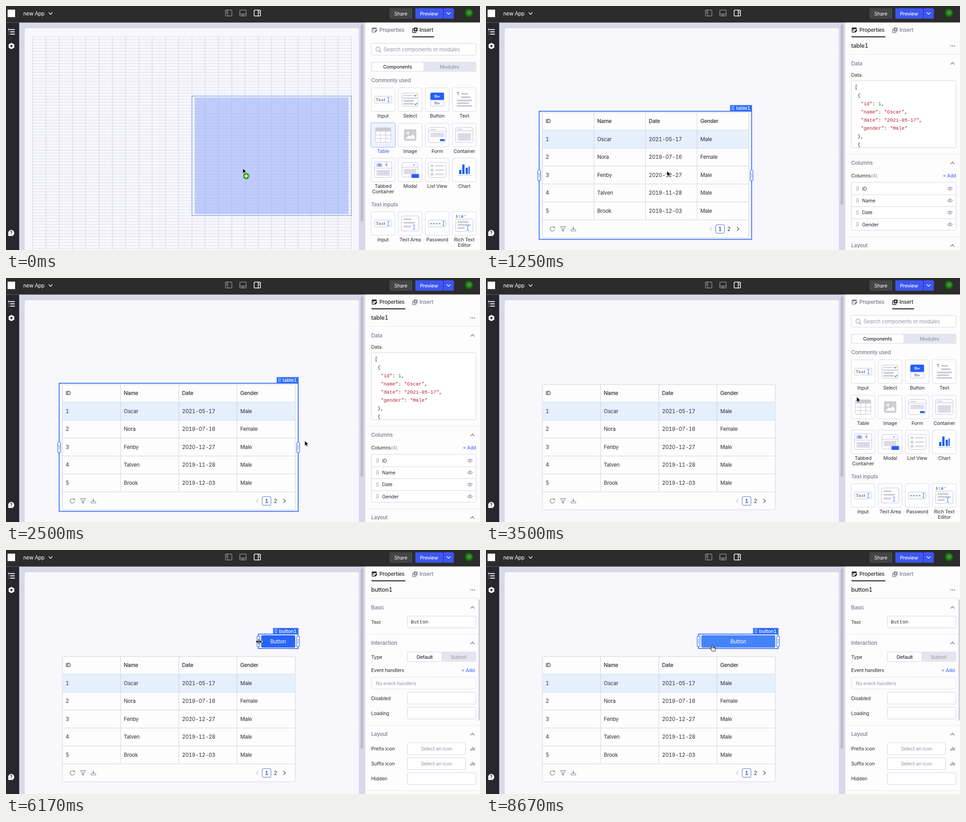
Write an HTML page that moves like this. It is 1041 by 538 pixels and loops after 8.76 s.

```html
<!DOCTYPE html>
<html lang="en">
<head>
<meta charset="utf-8">
<title>App builder</title>
<style>
html, body { margin: 0; width: 100%; height: 100%; overflow: hidden; background: #d8d8e8; }
svg { display: block; width: 1041px; height: 538px; }
text { font: 400 11.5px Inter, "Open Sans", sans-serif; letter-spacing: -.015em; fill: #2b2b33; font-variant-numeric: tabular-nums; }
text.s { font-size: 10.7px; }
text.b { font-weight: 500; }
text.bb { font-weight: 600; }
text.m { text-anchor: middle; }
text.h { fill: #797993; font-weight: 500; }
text.g { fill: #9696aa; }
text.w { fill: #fff; }
text.blue { fill: #315efb; }
text.title { font-size: 12.8px; font-weight: 500; }
text.mono { font: 10.7px "Liberation Mono", monospace; letter-spacing: 0; }
text.tiny { font-size: 7px; font-weight: 700; letter-spacing: .2px; fill: #77778c; }
text.icon { font-size: 9px; font-weight: 700; letter-spacing: .6px; fill: #77778c; }
text.w.tiny { fill: #fff; }
text.js { font-size: 10px; font-style: italic; font-weight: 700; fill: #77778c; }
.red { fill: #b3202c; } .green { fill: #1d7a48; } .soft { fill: #8f8fa3; }
</style>
</head>
<body>
<svg viewBox="0 0 1041 538">
  <defs>
    <radialGradient id="leaf" cx=".6" cy=".45"><stop offset="0" stop-color="#4fae34"/><stop offset=".55" stop-color="#247a1c"/><stop offset="1" stop-color="#123c12"/></radialGradient>
  </defs>
  <g id="shell"></g>
  <g id="live"></g>
</svg>
<script>
const LOOP = 8760, BLUE = '#2f6bf6', LINE = '#d3d3e0', ICON = '#77778c', PALE = '#dcdce8';
const COL = 700 / 24, ROW = 6.58, GX = 58.4, GY = 67;
const gx = c => GX + c * COL, gy = r => GY + r * ROW;

const R = (x, y, w, h, fill = 'none', rx = 0, stroke = 'none', more = '') =>
  `<rect x="${x}" y="${y}" width="${w}" height="${h}" fill="${fill}" rx="${rx}" stroke="${stroke}" ${more}/>`;
const T = (x, cy, s, cls = '') => `<text x="${x}" y="${cy + 4}" class="${cls}">${s}</text>`;
const P = (d, stroke, w = 1.2, fill = 'none') =>
  `<path d="${d}" stroke="${stroke}" stroke-width="${w}" fill="${fill}" stroke-linecap="round" stroke-linejoin="round"/>`;
const C = (x, y, r, fill, stroke = 'none') => `<circle cx="${x}" cy="${y}" r="${r}" fill="${fill}" stroke="${stroke}"/>`;
const G = (x, y, s, more = '') => `<g transform="translate(${x} ${y}) ${more}">${s}</g>`;
const list = (n, f) => Array.from({ length: n }, (_, i) => f(i)).join('');
const chev = (x, y, turn = 0, color = ICON, r = 3.8) =>
  G(x, y, P(`M${-r} ${-r / 2}L0 ${r / 2}L${r} ${-r / 2}`, color, 1.4), `rotate(${turn})`);
const dots = (x, y, color) => list(6, i => R(x + i % 2 * 3.2, y - 4.4 + (i >> 1) * 3.4, 1.7, 1.7, color));
const hline = y => R(789, y, 252, 1, '#e8e8f0');
const box = (x, y, w, h) => R(x, y, w, h, '#fff', 3, LINE);

// ---- fixed frame around the workspace
const layoutIcon = (x, bar, color) => G(x, 15.5,
  R(-7, -6.5, 14, 13, 'none', 2, color, 'stroke-width="1.4"') + P(bar, color, 1.4));
const shell =
  R(0, 0, 1041, 538, '#d8d8e8') + R(41, 49, 734, 500, '#f7f7fc', 4) +
  R(0, 0, 1041, 36.5, '#2c2c2c') + R(0, 36.5, 29, 502, '#27272f') +
  R(3.5, 8, 16.5, 16.5, '#fff') +
  T(38, 16.5, 'new App', 'w') + chev(98, 16.5, 0, '#fff') +
  layoutIcon(489, 'M-2-6V6M-5-3H-4M-5 0H-4', '#8c8c8c') +
  layoutIcon(520.5, 'M-7 2H7M-3 4.4H3', '#8c8c8c') +
  layoutIcon(552, 'M2-6V6M4-3H5M4 0H5', '#fff') +
  R(842, 5, 50, 23, '#454545', 3) + T(867, 16.5, 'Share', 'w s m') +
  R(899, 5, 84.5, 23, '#3b57f3', 3) + R(960, 5, 1, 23, '#2c2c2c') +
  T(929, 16.5, 'Preview', 'w s m b') + chev(972, 16.5, 0, '#fff', 3.4) +
  C(1015, 16, 10.5, 'url(#leaf)') +
  P('M10 52H18.5M10 57H18.5M10 62H18.5', '#fff', 1.9) + P('M6 50.5L8 52L6 53.5ZM6 57H7M6 62H7', '#fff', 1.2, '#fff') +
  P('M12 82L17.5 85V91.5L12 94.5L6.5 91.5V85Z', '#fff', 1.4, '#fff') + C(12, 88.2, 2.4, '#27272f') +
  P('M5.2 506.5L6 502L9 506Z', '#fff', 1, '#fff') + C(11.5, 500.5, 6.7, '#fff') +
  T(11.5, 500.3, '?', 's bb m');

// ---- component cards
const beam = (x, y, color = BLUE, h = 5) =>
  P(`M${x - 2} ${y - h}Q${x} ${y - h} ${x} ${y - h + 1.5}Q${x} ${y - h} ${x + 2} ${y - h}M${x} ${y - h + 1}V${y + h - 1}M${x - 2} ${y + h}Q${x} ${y + h} ${x} ${y + h - 1.5}Q${x} ${y + h} ${x + 2} ${y + h}`, color, 1);
const frame = (x, y, w, h) => R(x, y, w, h, '#fff', 2.5, '#b9c0dc');
const bar = (x, y, w, c = '#c9c9d3') => R(x, y, w, 3.6, c, .8);
const icons = {
  Input: frame(-19, -7.5, 38, 15) + T(-16, -.6, 'Text', 'icon') + beam(11.5, 0),
  Select: frame(-18, -14.5, 35.5, 10.5) + bar(-15, -11, 20, PALE) + chev(11, -9, 0, ICON, 2.6) +
    frame(-18, -2.5, 35.5, 17) + bar(-14.5, 1, 22) + bar(-14.5, 7.5, 22) + P('M10 9.5L12 11.3L15 7.8', BLUE, 1.5),
  Button: R(-15, -15.5, 30, 16, '#2160fb', 2.5) + T(0, -8.8, 'Btn', 'tiny w m') + frame(-15, 1.5, 30, 12.5) + T(0, 6.3, 'Btn', 'tiny m'),
  Text: T(-16.5, -14, 'T', 'icon') + bar(-7, -14.5, 15) + bar(-7, -7.2, 20) + bar(-16.5, 0, 33) + bar(-16.5, 6, 27) + bar(-16.5, 12, 33),
  Table: R(-17, -16, 34, 32, '#fff', 3, '#c6c6d0') + R(-17, -16, 34, 8, '#cbcbd4', 2) +
    P('M-17 0H17M-17 8H17M-6-8V16M6-8V16', '#c6c6d0', 1.2),
  Image: R(-13.5, -12.5, 27, 25, '#cbcbd1', 3) + C(-5, -4.5, 2.5, '#fff') + P('M-10 8L-3 1L1 4L6-2L10 4V8Z', '#fff', .5, '#fff'),
  Form: frame(-19, -16.5, 38, 33) + P('M-15-12H-4', '#b9b9c8', 1.6) + P('M-19-8.5H19', '#b9c0dc', 1) +
    R(-15, -5, 30, 9.5, PALE, 1) + R(6, 9, 10.5, 4.5, '#2160fb', 1),
  Container: frame(-19, -16.5, 38, 33) + P('M-15-12.5H-4', '#b9b9c8', 1.6) + P('M-19-9H19', '#b9c0dc', 1) + R(-14.5, -4, 29, 16.5, PALE, 1),
  'Tabbed|Container': frame(-19, -18, 38, 34.5) + P('M-19-4H19', '#b9c0dc', 1) + R(-15, -15, 14, 8.5, '#b5cafd', 4) +
    T(-8, -12.2, 'A', 'tiny m') + T(7.5, -12.2, 'B', 'tiny m') + R(-14.5, 0, 29, 12.5, PALE, 1),
  Modal: frame(-18, -16.5, 35, 32) + P('M7-12.5L10-9.5M10-12.5L7-9.5', ICON, 1) + P('M-18-6H17', '#b9c0dc', 1) +
    R(-14, -2.5, 27, 12, PALE, 1) + R(3, 9, 16.5, 8.5, '#2160fb', 1.5),
  'List View': frame(-19, -16.5, 38, 33) + list(3, i => R(-14.5, -12 + i * 9.5, 6, 5.5, '#cfcfd9', 1) + bar(-5, -11 + i * 9.5, 20, PALE)),
  Chart: R(-11.5, 0, 5, 9, '#2160fb') + R(-4.5, -12, 5, 21, '#2160fb') + R(3, -5, 5, 14, '#2160fb') + R(9.5, -8, 2.5, 17, '#2160fb') + P('M-15 12H15', '#b9c0dc', 1.2),
  'Text Area': frame(-19, -16.5, 38, 33) + bar(-14.5, -11, 17) + bar(-14.5, -3.5, 25) + bar(-14.5, 5, 16) + beam(8.5, 8),
  Password: frame(-19, -7.5, 38, 15) + T(-16.5, 1.6, '****', 'icon') + beam(13.5, 0),
  'Rich Text|Editor': T(-18.5, -17, 'B <tspan font-style="italic">I</tspan> <tspan fill="#2160fb">A</tspan> ”', 'tiny') +
    frame(-19, -9.5, 38, 27) + bar(-14.5, -5, 24) + bar(-14.5, 1.5, 29) + bar(-14.5, 8.5, 15) + beam(7.5, 10),
};
const names = Object.keys(icons);
const rows = [[206.5, names.slice(0, 4)], [284.5, names.slice(4, 8)], [361.5, names.slice(8, 12)],
  [479.5, ['Input', ...names.slice(12)]]];

function card(name, x, y, on) {
  const label = name.split('|').map((s, i) => T(x, y + 35.5 + i * 12, s, 's m' + (on ? ' blue' : ''))).join('');
  const base = on ? R(x - 27, y - 27, 54, 54, '#edf2fc', 3, '#8fb0fb') : R(x - 26, y - 26, 52, 52, '#fff', 3, '#d6d8e6');
  return base + G(x, y, icons[name]) + label;
}

// ---- side panels
function tabs(insert) {
  const a = insert ? '#7c7c94' : '#1c1c22', b = insert ? '#1c1c22' : '#7c7c94';
  const tab = (x, s, on) => T(x, 53, s, on ? 'b' : 'h');
  return R(789, 36.5, 252, 502, '#fdfdfe') +
    G(803.5, 47.5, R(0, 0, 10.5, 3.5, a, 1) + P('M.7 3V9.5Q.7 10.5 1.7 10.5H4M10 3.5V4.5M2.5 6H5', a, 1.4) + P('M6 10.5L6.5 8.2L9.8 5L11.5 6.7L8.3 10Z', a, 1, a)) +
    tab(820, 'Properties', !insert) +
    G(892.5, 47.5, P('M2 3H.7V11H8V9.5', b, 1.4) + R(3, 0, 8.3, 8.3, b, 1.5) + P('M7.1 2V6.2M5 4.1H9.2', '#fff', 1.2)) +
    tab(908, 'Insert', insert) + (insert ? R(892, 67, 48, 2, '#1c1c22') : R(802.5, 67, 74.5, 2, '#1c1c22'));
}
const section = (y, s) => T(802, y, s, 'h') + chev(1024.5, y, 180);
const head = s => tabs(false) + T(802, 88, s, 'title') + list(3, i => C(1020.5 + i * 4.2, 88, 1.2, ICON)) + hline(106);

const insertPanel = on => tabs(true) +
  box(802.5, 82.5, 230, 26) + C(817, 95.2, 4.6, 'none', ICON) + P('M820.5 98.8L823 101.5', ICON) +
  T(829, 95.8, 'Search components or modules', 'g') +
  R(802, 123, 231, 22, '#e5e5ee', 3) + R(803.5, 124, 114, 20, '#fff', 3, '#dedee8') +
  T(860, 134, 'Components', 's b m') + T(974, 134, 'Modules', 's g m b') +
  T(802, 164, 'Commonly used', 'h') + T(802, 437.5, 'Text inputs', 'h') +
  rows.map(([y, set]) => set.map((n, i) => card(n, 828.2 + i * 59.45, y, n === on)).join('')).join('');

const red = s => `<tspan class="red">"${s}"</tspan>`;
const code = [[810, '['], [816, '{'], [823, red('id') + ': <tspan class="green">1</tspan>,'], [823, red('name') + ': ' + red('Oscar') + ','],
  [823, red('date') + ': ' + red('2021-05-17') + ','], [823, red('gender') + ': ' + red('Male')], [816, '},'], [816, '{']];
const heads = ['ID', 'Name', 'Date', 'Gender'];
const eye = (x, y) => P(`M${x - 5.5} ${y}Q${x} ${y - 7} ${x + 5.5} ${y}Q${x} ${y + 7} ${x - 5.5} ${y}Z`, ICON, 1) + C(x, y, 1.7, 'none', ICON);
const tablePanel = head('table1') + section(126.5, 'Data') + T(802, 152, 'Data', 's') +
  box(802.5, 164.5, 230, 148) + code.map(([x, s], i) => T(x, 178.4 + i * 18.1, s, 'mono')).join('') +
  hline(326) + section(346, 'Columns') + T(802, 373.5, 'Columns<tspan class="soft">(4)</tspan>', 's') + T(1003, 373.5, '+ Add', 's blue') +
  box(802.5, 389, 230, 105.5) +
  heads.map((s, i) => {
    const y = 402.5 + i * 26.4;
    return dots(813.5, y, '#8a8a9c') + T(826, y, s, 's') + eye(1019, y) + (i ? R(803, y - 13.3, 229, 1, LINE) : '');
  }).join('') + hline(509) + section(528, 'Layout');

const field = (y, s, w = 151) => T(802, y, s, 's') + box(881.5, y - 13, w, 26);
const pick = (y, s) => field(y, s, 128) + T(945.5, y, 'Select an icon', 's g m') + T(1019, y, 'Js', 'js');
const buttonPanel = head('button1') + section(126.5, 'Basic') + field(158.7, 'Text') + T(889, 158.3, 'Button', 'mono') +
  hline(185) + section(205, 'Interaction') + T(802, 235.8, 'Type', 's') +
  R(881, 224, 152, 22.5, '#e5e5ee', 3) + R(882, 225, 75, 20.5, '#fff', 3, '#dedee8') +
  T(919.5, 235.5, 'Default', 's b m') + T(994, 235.5, 'Submit', 's g m') +
  T(802, 265.3, 'Event handlers', 's') + T(1000, 265.3, '+ Add', 's blue') +
  R(802.5, 280.5, 230, 26, 'none', 3, '#cfcfdc', 'stroke-dasharray="2.5 2"') + T(812, 293.5, 'No event handlers', 's g') +
  field(326.7, 'Disabled') + field(359.5, 'Loading') + hline(386) + section(406, 'Layout') +
  pick(438, 'Prefix icon') + pick(471, 'Suffix icon') + field(504, 'Hidden') + hline(530) + R(1037.5, 109, 5, 267, '#d3d3de', 2);

// ---- canvas parts
const grid = list(72, i => R(GX, gy(i), 700, 1, '#dadaf0', 0, 'none', 'opacity=".85"')) +
  list(25, i => R(gx(i) - .5, GY, 1, 471, '#d3d3e2'));

const data = [['1', 'Oscar', '2021-05-17', 'Male'], ['2', 'Nora', '2019-07-16', 'Female'], ['3', 'Fenby', '2020-12-27', 'Male'],
  ['4', 'Talven', '2019-11-28', 'Male'], ['5', 'Brook', '2019-12-03', 'Male']];
function table(edge) {
  const l = 124, r = edge - 6.4, w = (r - l) / 4, y = i => 254.3 + i * 39.5;
  return R(l, 235, r - l, 276, '#fdfdfe', 2, '#d0d0de') + R(l + .5, 274, r - l - 1, 39, '#e6effc') +
    list(6, i => R(l, 273.3 + i * 39.55, r - l, 1, '#d0d0de')) + list(3, i => R(l + w * (i + 1) - .5, 235, 1, 236, '#d0d0de')) +
    heads.map((s, c) => T(l + 7 + w * c, y(0), s, 'b')).join('') +
    data.map((d, i) => d.map((s, c) => T(l + 7 + w * c, y(i + 1) - .2, s)).join('')).join('') +
    P('M150 488.6A5 5 0 1 0 150.7 492M150.6 486V489H147.6', ICON, 1.2) +
    P('M164 486.5H174L170.4 491.5V496.5L167.6 495V491.5Z', ICON, 1.2) +
    P('M187 492V496H197V492M192 486V492.5M189.5 490.3L192 492.8L194.5 490.3', ICON, 1.2) +
    chev(r - 83.5, 491.5, 90, '#c4c4d0') + R(r - 72.5, 482, 19, 19, '#fff', 3, BLUE) +
    T(r - 63, 491.5, '1', 'm b') + T(r - 43.5, 491.5, '2', 'm') + chev(r - 23.5, 491.5, -90, '#55556a');
}
const dashed = (x, y, w, h) => R(x, y, w, h, 'none', 0, '#5a8bf7', 'stroke-width="1.5" stroke-dasharray="3 1.4"');
function ghost(c, r, cols, rowCount) {
  const x = gx(c), w = Math.min(x + cols * COL, gx(24)) - x, h = rowCount * ROW;
  return R(x + 6, gy(r) + 3, w - 12, h - 6, '#7f9bf8', 0, 'none', 'opacity=".46"') + dashed(x, gy(r), w, h);
}
function selection(x, y, r, b, name, tagW) {
  const cy = (y + b) / 2;
  const grip = hx => R(hx - 3, cy - 11.5, 6, 23, '#fff', 2, BLUE, 'stroke-width="1.2"') +
    list(3, i => R(hx - 1.5, cy - 4 + i * 3.5, 3, 1, BLUE));
  return R(x, y, r - x, b - y, 'none', 0, BLUE, 'stroke-width="1.8"') + grip(x) + grip(r) +
    R(r - tagW + .8, y - 13.5, tagW, 13.5, BLUE) + dots(r - tagW + 4.5, y - 6.8, '#fff') + T(r - tagW + 13.8, y - 6.8, name, 's b w');
}
const button = (x, over) => R(x + 6.2, 188, 629 - x, 27, over ? '#4583f9' : '#2964f7', 3) + T((x + 641.4) / 2, 201.5, 'Button', 'w m') +
  selection(x, 185.4, 641.4, 217.2, 'button1', 55.5);

const arrow = P('M0 0V11.4L2.7 9L4.6 13L6.6 12.1L4.8 8.2H8.3Z', '#fff', .9, '#000');
const cursors = {
  arrow,
  copy: arrow + C(7.5, 17, 7.6, '#2c9c22', '#c9dfc6') + P('M3.8 17H11.2M7.5 13.3V20.7', '#fff', 2),
  beam: beam(0, 0, '#111', 6.3) + P('M-1.5 1.5H1.5', '#111', 1),
  size: P('M-6 0H6M0-5.5V5.5', '#fff', 4) + P('M-5 0H5M0-5.5V5.5', '#111', 1.7) + P('M-6.2 0L-3-2.8V2.8ZM6.2 0L3-2.8V2.8Z', '#111', .6, '#111'),
  hand: P('M-2.3 1V-5.2A1.3 1.3 0 0 1 .3-5.2V-1.2L5-.4Q6.6 0 6.4 1.8L5.2 7H-1.2L-4.8 2.2Q-5.8.6-4.4.2Q-3.4 0-2.3 1Z', '#222', 1.1, '#fff') + P('M.3-1V1.5M2.5-.7V1.5M4.6-.3V1.7', '#222', .7),
};

// ---- motion: [ms, values...]
const pointer = [[0, 520, 358], [250, 415, 359], [500, 357, 361], [750, 338, 361], [1170, 338, 361], [1500, 583, 373], [1670, 587, 373],
  [2000, 626, 372.5], [2250, 641, 372.5], [2420, 642, 372], [2750, 700, 318], [2920, 711, 303], [3420, 711, 303], [3500, 814, 262],
  [3920, 920, 217], [4170, 944, 204], [4500, 947, 203], [4670, 864, 198], [4920, 725, 199], [5170, 612, 201], [5250, 600, 201], [5670, 600, 201],
  [6000, 558, 202], [6170, 555.5, 202], [6250, 551, 202], [6750, 477, 203], [7000, 474, 203], [8500, 474, 203], [8670, 498, 216]];
const shapes = [[0, 'copy'], [670, 'beam'], [1000, 'arrow'], [1500, 'size'], [2500, 'arrow'], [4920, 'copy'], [5420, 'arrow'], [6000, 'size'], [8670, 'hand']];
const drag = [[0, 12, 20], [250, 7, 22], [500, 4, 24], [750, 2, 25]];
const dragButton = [[4920, 21, 18], [5170, 17, 18]];
const tableEdge = [[1670, gx(18)], [2000, 592], [2420, gx(20)]];
const buttonLeft = [[6250, gx(17)], [6920, gx(14)]];
const thumbEnd = [[0, 475], [750, 452], [920, 452], [1000, 438]];

function at(track, t) {
  const i = track.findIndex(k => k[0] > t);
  if (i === 0) return track[0].slice(1);
  if (i < 0) return track[track.length - 1].slice(1);
  const a = track[i - 1], b = track[i], p = (t - a[0]) / (b[0] - a[0]);
  return a.slice(1).map((v, j) => v + (b[j + 1] - v) * p);
}
const within = (t, ...spans) => spans.some(([a, b]) => t >= a && t < b);

function scene(t) {
  const gridOn = within(t, [0, 1250], [1670, 2500], [4670, 5500], [6250, 7000]);
  const tableSel = within(t, [1000, 2920]);
  const [edge] = at(tableEdge, t), [end] = at(thumbEnd, t), [x, y] = at(pointer, t);
  const shape = shapes.filter(s => s[0] <= t).pop()[1];
  let s = R(779, 41, 5.2, end - 41, '#b9b9cb', 2.6) + (gridOn ? grid : '');
  if (t < 1000) {
    s += ghost(...at(drag, t).map(Math.round), 16, 40);
  } else {
    s += table(edge);
    if (tableSel) s += selection(gx(2), 232, edge, 514.5, 'table1', 48);
    else if (gridOn) s += dashed(gx(2), 232, edge - gx(2), 282.5);
  }
  if (within(t, [4920, 5420])) s += ghost(...at(dragButton, t).map(Math.round), 3, 5);
  if (t >= 5420) s += button(at(buttonLeft, t)[0], t >= 6420);
  if (tableSel) s += tablePanel;
  else if (t >= 5500) s += buttonPanel;
  else s += insertPanel(t < 1000 ? 'Table' : t >= 4500 ? 'Button' : '') + (t >= 3670 ? R(1037.5, 163, 5, 65, '#e0e0e8', 2) : '');
  return s + G(x, y, cursors[shape]);
}

// Time advances in alternating holds of 170 and 80 ms.
function tick(t) {
  const r = t % 250;
  return Math.round(t - r) + (r >= 170 ? 170 : 0);
}
const live = document.getElementById('live');
document.getElementById('shell').innerHTML = shell;
const start = performance.now();
let shown = -1;
function paint() {
  const t = tick(Math.max(0, performance.now() - start) % LOOP);
  if (t !== shown) live.innerHTML = scene(shown = t);
  requestAnimationFrame(paint);
}
paint();
</script>
</body>
</html>
```
